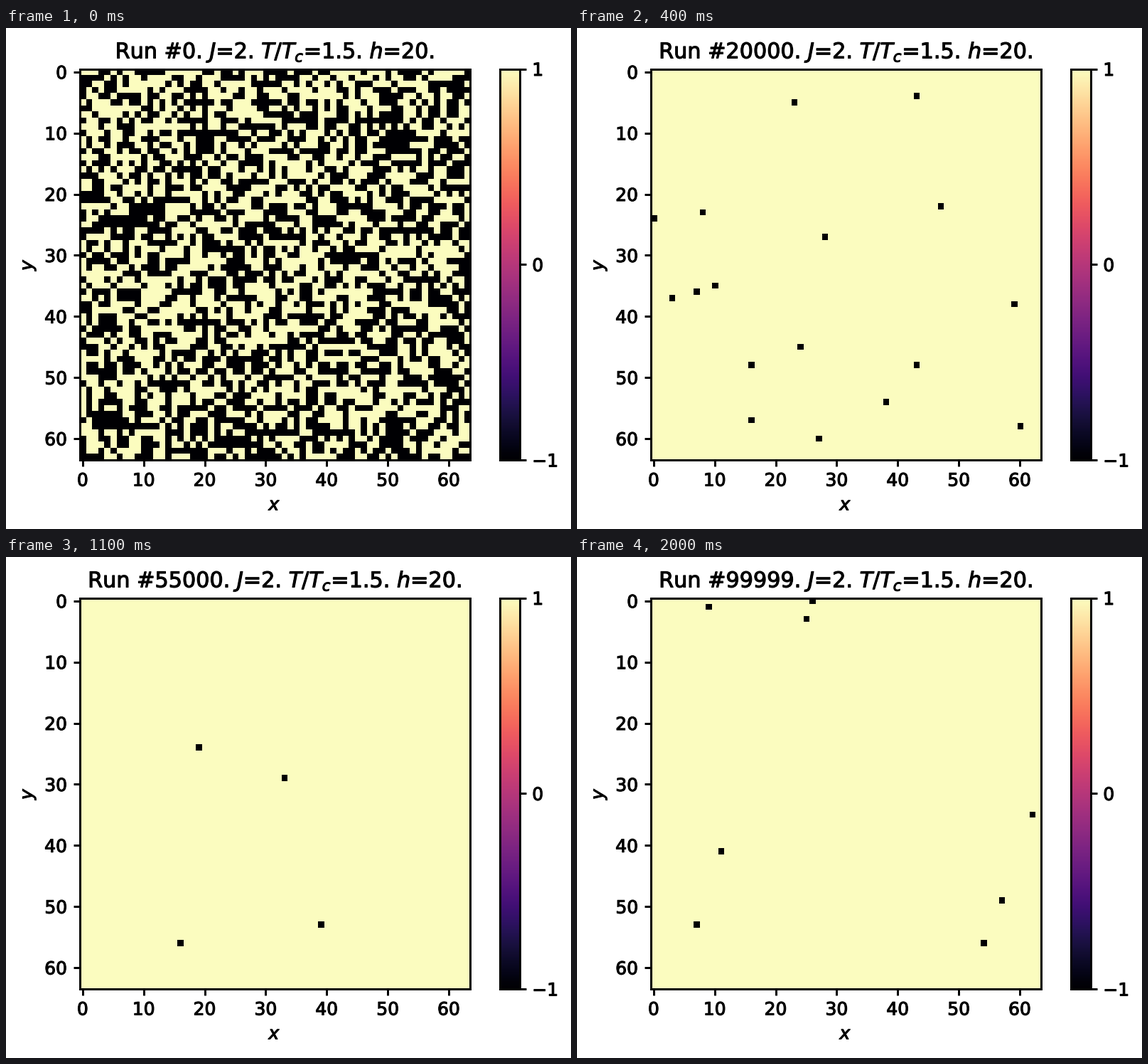
Recreate the animation shown at these times as a matplotlib script. Size 795 by 704 pixels, loop 2.1 s.

```python
import numpy as np
import matplotlib.pyplot as plt
from matplotlib import patheffects
from matplotlib.animation import FuncAnimation

W, H, DPI = 795, 704, 180
SIZE = 64                # lattice side
SITES = SIZE**2
STEP, LAST = 5000, 99999  # Monte Carlo steps per frame, final step
FRAMES = 21
STRAY = 5                # mean number of thermally flipped spins

rng = np.random.default_rng(7)

# A down spin aligns with the field the next time its site is picked
down = rng.random((SIZE, SIZE)) < 0.5
picked = rng.exponential(SITES, (SIZE, SIZE))

# Thermal flips: each spin turns down at a random step, then recovers
flips = STRAY * LAST // SITES
col, row = rng.integers(0, SIZE, (2, flips))
born = rng.uniform(0, LAST, flips)
healed = born + rng.exponential(SITES, flips)


def step_at(n):
    return min(n * STEP, LAST)


def lattice(step):
    spins = np.where(down & (picked > step), -1, 1)
    flipped = (born <= step) & (step < healed)
    spins[row[flipped], col[flipped]] = -1
    return spins


def title(step):
    return f"Run #{step}. $J$=2. $T/T_c$=1.5. $h$=20."


def add_axes(left, top, right, bottom):
    return fig.add_axes([left / W, 1 - bottom / H,
                         (right - left) / W, (bottom - top) / H])


plt.rcParams.update({
    "font.family": "DejaVu Sans", "font.size": 10, "axes.titlesize": 12.1,
    "axes.linewidth": 1.2, "xtick.major.width": 1.2, "ytick.major.width": 1.2,
})
fig = plt.figure(figsize=(W / DPI, H / DPI), dpi=DPI, facecolor="white")
ax = add_axes(103.5, 57.5, 653, 607)
cax = add_axes(694.8, 57.5, 722.8, 607)

image = ax.imshow(lattice(0), cmap="magma", vmin=-1, vmax=1,
                  interpolation="nearest", aspect="auto")
ax.set_xticks(range(0, SIZE, 10))
ax.set_yticks(range(0, SIZE, 10))
ax.set_xlabel("$x$")
ax.set_ylabel("$y$")
heading = ax.set_title(title(0))
fig.colorbar(image, cax=cax, ticks=[-1, 0, 1])

# Slightly heavier lettering
heavy = [patheffects.withStroke(linewidth=0.45, foreground="black")]
labels = [heading, ax.xaxis.label, ax.yaxis.label]
for axis in (ax.xaxis, ax.yaxis, cax.yaxis):
    labels += axis.get_ticklabels()
for label in labels:
    label.set_path_effects(heavy)


def update(n):
    step = step_at(n)
    image.set_data(lattice(step))
    heading.set_text(title(step))
    return image, heading


anim = FuncAnimation(fig, update, frames=FRAMES, interval=100,
                     repeat=True, repeat_delay=0, blit=False)
plt.show()
```
